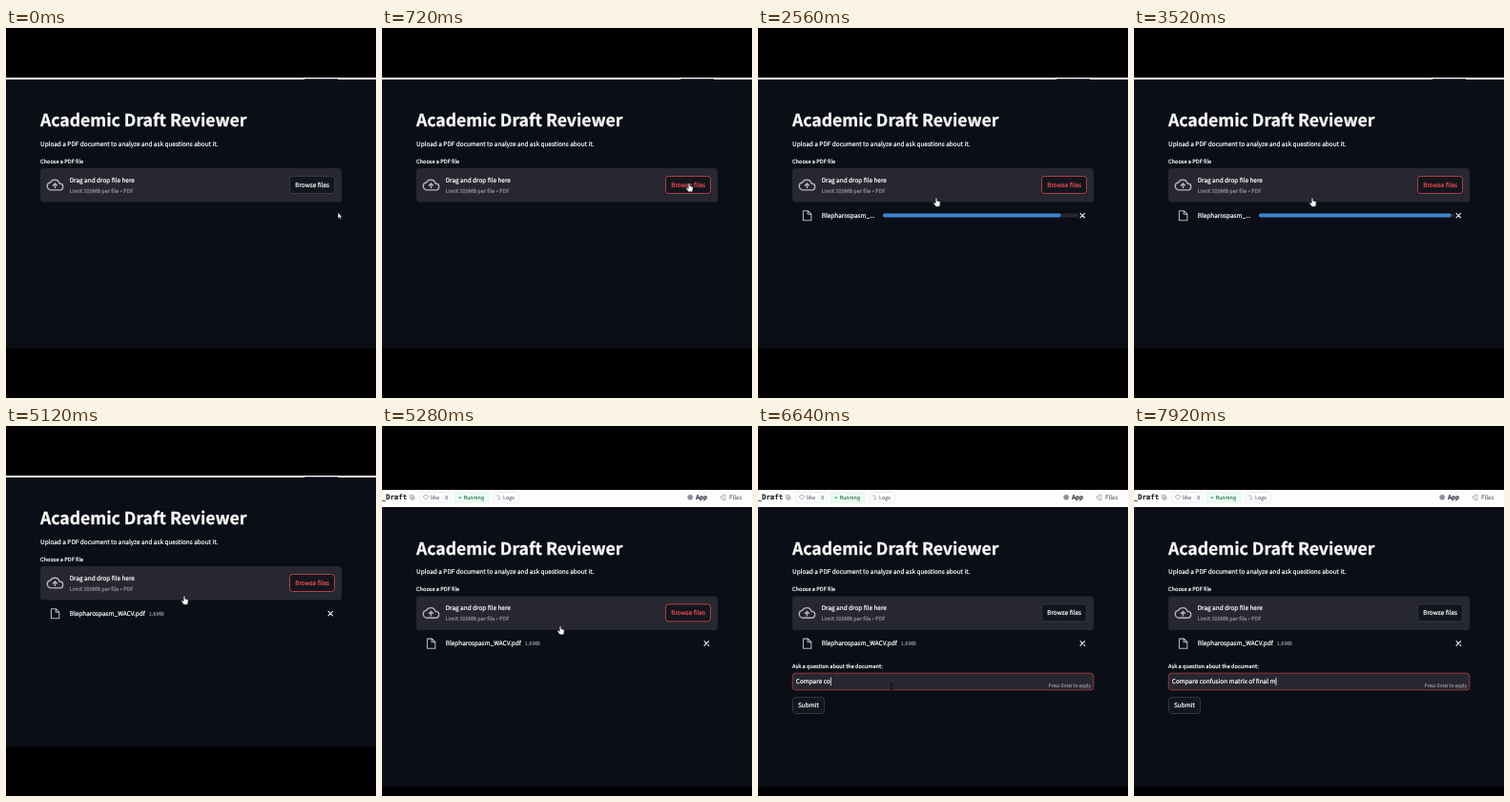
Animation of 388 by 388 pixels, one loop 8 s. Source, as an HTML page:

```html
<!DOCTYPE html>
<html lang="en">
<head>
<meta charset="utf-8">
<style>
html, body { margin: 0; width: 100%; height: 100%; overflow: hidden; background: #000; }
svg { display: block; width: 388px; height: 388px; }
text {
  font: 6.43px "Noto Sans CJK JP", "Noto Sans CJK SC", "Noto Sans", sans-serif;
  color: #fafafa; fill: currentColor; stroke: currentColor; stroke-width: .22;
  white-space: pre; text-rendering: geometricPrecision;
}
.title { font-size: 17.6px; font-weight: 700; stroke-width: .3; }
.small { font-size: 5.63px; }
.tiny { font-size: 4.81px; }
.dim { color: #8b8c93; }
.box { fill: #262730; }
.btn rect { fill: #13161e; stroke: #3b3e47; stroke-width: .8; }
.btn.hot rect { stroke: #d9474b; }
.btn.hot text { color: #f04c4f; }
.line { fill: none; stroke: #b4b6bc; stroke-width: 1.1; stroke-linejoin: round; stroke-linecap: round; }
.head text { font-size: 5.5px; color: #5d6470; stroke-width: .1; }
.head .repo { font: 700 7.4px "DejaVu Sans Mono", "Liberation Mono", monospace; color: #15181f; }
.pill { fill: #fff; stroke: #dfe2e7; stroke-width: .6; }
.glyph { fill: none; stroke: #8a919d; stroke-width: .7; }
</style>
</head>
<body>
<svg viewBox="0 0 388 388">
  <rect width="388" height="388"/>
  <rect id="page" width="388" fill="#0b0e16"/>
  <g id="edge">
    <rect y="52" width="388" height="2" fill="#fff"/>
    <rect x="313" y="53" width="35" height="1" fill="#555a63"/>
  </g>

  <g id="head" class="head">
    <rect y="67" width="388" height="18" fill="#fdfdfe"/>
    <text class="repo" x="-.5" y="77.2">_Draft</text>
    <path class="glyph" d="M29.5 72.5h3v3.5h-3zM31 74h3v3.2h-3z"/>
    <rect class="pill" x="39.5" y="69.5" width="32.5" height="10.5" rx="2"/>
    <path class="glyph" d="M46 77.2l-2.4-2.4a1.4 1.4 0 0 1 2.4-1.6a1.4 1.4 0 0 1 2.4 1.6z"/>
    <text x="51" y="76.7">like</text>
    <path class="pill" d="M63 69.5v10.5"/>
    <text x="66" y="76.7">0</text>
    <rect x="75" y="69" width="38" height="12" rx="2.5" fill="#eafaf1"/>
    <circle cx="81.7" cy="75.2" r="1.1" fill="#45b883"/>
    <text x="85.5" y="77" style="color:#2c6b50">Running</text>
    <rect class="pill" x="117.3" y="69.5" width="26.5" height="10.5" rx="2"/>
    <path class="glyph" d="M120 73h3M121.5 75h3M121.5 77h3"/>
    <text x="127" y="76.7">Logs</text>
    <circle cx="323.2" cy="74.8" r="2.8" fill="#8b8f99"/>
    <text x="329" y="77.2" style="font-size:6.3px;font-weight:700;color:#20242c">App</text>
    <path class="glyph" d="M357.5 72h2.5v5.5h-2.5zM355.5 73v3.5"/>
    <text x="364" y="77.2" style="font-size:6.3px">Files</text>
  </g>

  <g id="app">
    <text class="title" x="36" y="103.2">Academic Draft Reviewer</text>
    <text x="36" y="123.6">Upload a PDF document to analyze and ask questions about it.</text>
    <text class="small" x="36" y="141.6">Choose a PDF file</text>
    <rect class="box" x="36" y="147" width="316" height="35.5" rx="3"/>
    <g class="line" stroke-width="1.4" style="stroke-width:1.4">
      <path d="M55.9 163C55.4 160.8 53.6 159.2 51.2 159.2c-2 0-3.8 1.1-4.6 2.8C44.6 162.2 43.3 164 43.3 165.8c0 2.3 1.8 4.1 4.1 4.1h8.8c2 0 3.5-1.5 3.5-3.5c0-1.9-1.6-3.4-3.8-3.4z"/>
      <path d="M51.4 167.5v-4.4m-2 2l2-2l2 2"/>
    </g>
    <text x="66.7" y="162">Drag and drop file here</text>
    <text class="small dim" x="66.7" y="172.7">Limit 200MB per file • PDF</text>
    <g id="browse" class="btn">
      <rect x="297.5" y="155.5" width="47" height="18" rx="3"/>
      <text x="303.2" y="166.8">Browse files</text>
    </g>

    <g id="file">
      <path class="line" d="M47.4 191.7h5l3.4 3.4v6.7h-8.4zM52.2 191.9v3.4h3.4"/>
      <text id="name" x="66.7" y="198.7"></text>
      <text id="size" class="small dim" x="149.7" y="198.7">1.6MB</text>
      <g id="bar">
        <rect class="box" x="131" y="194.6" width="205" height="4" rx="1.8"/>
        <rect id="fill" x="131" y="194.6" height="4" rx="1.8" fill="#3c83cd"/>
      </g>
      <path class="line" style="stroke:#eceef1" d="M338 194.3l4.6 4.6m0-4.6l-4.6 4.6"/>
    </g>
  </g>

  <g id="ask">
    <text class="small" x="36" y="253.7">Ask a question about the document:</text>
    <rect id="input" class="box" x="36.2" y="259.2" width="315.6" height="17.6" rx="3" stroke-width=".8"/>
    <text id="typed" x="39.8" y="270.4"></text>
    <rect id="caret" y="263.6" width=".8" height="8.6" fill="#fff"/>
    <text id="hint" class="tiny dim" x="349" y="274.2" text-anchor="end">Press Enter to apply</text>
    <g class="btn">
      <rect x="36.5" y="284.5" width="33" height="17" rx="3"/>
      <text x="42" y="295.4">Submit</text>
    </g>
  </g>

  <g id="pointer" stroke-width=".5">
    <path id="arrow" d="M0 0v6.4l1.5-1.3l1 2.2l1.1-.5l-1-2.1h2z" fill="#fff" stroke="#000"/>
    <path id="hand" d="M-.8 .4q.8-1.3 1.6 0v2.4l2.6.7q.9.4.7 1.4l-.7 3.8h-3.9l-2.6-3.5q.1-1.1 1.2-.6l1.1.9z" fill="#fff" stroke="#222"/>
    <path id="beam" d="M-1.2 -.6h2.4M0 -.6v5.8M-1.2 5.2h2.4" fill="none" stroke="#08090c" stroke-width=".9"/>
  </g>
</svg>
<script>
const LOOP = 8000, STEP = 80, SHIFT = 31.4;
const QUESTION = "Compare confusion matrix of final m";
const T = { row: 1920, done: 3920, jump: 5280, ask: 5680, focus: 5920, hide: 6960 };

// Rows of [time, values...]
const PATH = [[0, 348, 193.5], [80, 348, 193.5], [480, 322, 163], [800, 322, 163], [1360, 121, 128],
  [2160, 121, 128], [2480, 187, 178.5], [5200, 187, 178.5], [5280, 187, 210], [5520, 187, 210], [5920, 140, 271]];
const UPLOAD = [[2160, 0], [2560, .915], [3040, .97], [3840, 1]];
const TYPING = [[5920, 0], [6080, 1], [6640, 10], [7920, 35]];

const $ = id => document.getElementById(id);
const show = (id, on) => $(id).style.display = on ? "" : "none";

function at(rows, t, col = 1, ease = x => x) {
  const i = rows.findIndex(r => r[0] > t);
  if (i < 0) return rows[rows.length - 1][col];
  if (!i) return rows[0][col];
  const a = rows[i - 1], b = rows[i];
  return a[col] + (b[col] - a[col]) * ease((t - a[0]) / (b[0] - a[0]));
}
const smooth = x => x * x * (3 - 2 * x);

function pointerKind(t) {
  if (t >= T.hide) return "";
  if (t >= T.focus) return "beam";
  return (t >= 320 && t < 880) || (t >= 2400 && t < T.ask) ? "hand" : "arrow";
}

function draw(t) {
  const low = t >= T.jump, done = t >= T.done, focus = t >= T.focus;
  const top = low ? 85 : 54;
  $("page").setAttribute("y", top);
  $("page").setAttribute("height", (low ? 378 : 336) - top);
  $("app").setAttribute("transform", `translate(0 ${low ? SHIFT : 0})`);
  show("edge", !low);
  show("head", low);
  $("browse").classList.toggle("hot", t >= 320 && !focus);

  show("file", t >= T.row);
  show("bar", !done);
  show("size", done);
  $("name").textContent = done ? "Blepharospasm_WACV.pdf" : "Blepharospasm_...";
  $("fill").setAttribute("width", 204 * at(UPLOAD, t));

  const count = Math.floor(at(TYPING, t) + 1e-6);
  show("ask", t >= T.ask);
  show("hint", count > 0);
  show("caret", focus);
  $("input").setAttribute("stroke", focus ? "#b83e45" : "#262730");
  $("typed").textContent = QUESTION.slice(0, count);
  $("caret").setAttribute("x", 40 + (count ? $("typed").getComputedTextLength() : 0));

  const kind = pointerKind(t);
  for (const id of ["arrow", "hand", "beam"]) show(id, id === kind);
  $("pointer").setAttribute("transform", `translate(${at(PATH, t, 1, smooth)} ${at(PATH, t, 2, smooth)})`);
}

const start = performance.now();
function tick() {
  const t = Math.max(0, performance.now() - start) % LOOP;
  draw(Math.floor(t / STEP) * STEP);
  requestAnimationFrame(tick);
}
tick();
</script>
</body>
</html>
```
